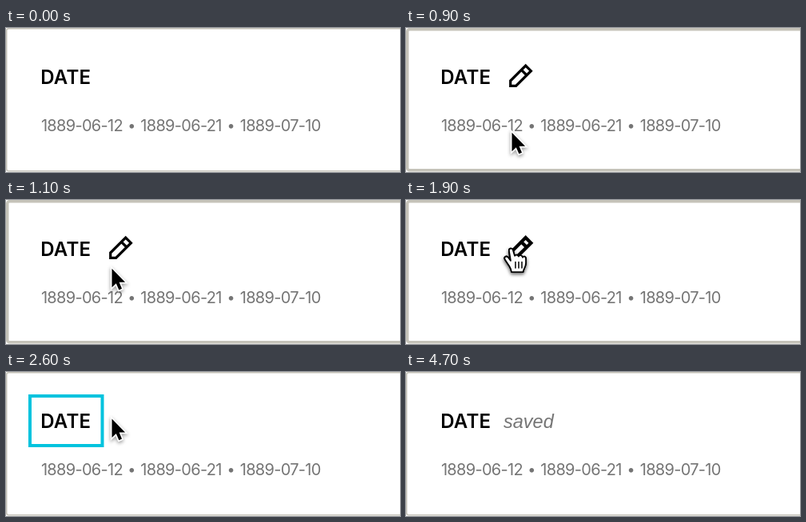
An HTML page with a canvas that plays this animation: 493x180 px, repeating every 6.2 s.

```html
<!DOCTYPE html>
<html lang="en">
<head>
<meta charset="utf-8">
<title>Date field</title>
<style>
html, body { margin: 0; width: 100%; height: 100%; overflow: hidden; background: #fff; }
canvas { display: block; width: 493px; height: 180px; }
</style>
</head>
<body>
<canvas id="stage"></canvas>
<script>
const W = 493, H = 180, LOOP = 6200;
const GRAY = '#757575', BORDER = '#c5c3b9', CYAN = '#00c3de';
const canvas = document.getElementById('stage');
const ctx = canvas.getContext('2d');
const dpr = window.devicePixelRatio || 1;
canvas.width = W * dpr;
canvas.height = H * dpr;

const ARROW = new Path2D('M0 0V23.4L5.3 18.4L8.9 26.6L12.5 25L9.1 17H16.6Z');
const HAND = new Path2D('M131 75L127.8 70.8C125.5 68 121.8 70.5 124 73.8L129.5 82' +
  'C131 84.5 131.6 85.5 132 89H146.5C146.5 86 150 83 150 78V72.5' +
  'C150 68.8 146.2 69 146 71C145.5 67.6 141.5 67.5 141 69.6' +
  'C140 67 136.8 67 136 68.8L133.8 61.5C132.8 58.3 128.2 59.3 129 63Z');
const KNUCKLES = new Path2D('M137 76.5V84M141 76.5V84M145 76.5V84');
const PENCIL = new Path2D('M130.7 72.3V66L149.7 47L156.4 53.7L137.6 72.3ZM144.4 52.4L151 59');

function text(str, x, y, font, color, align = 'left', spacing = '0px') {
  ctx.font = font;
  ctx.fillStyle = color;
  ctx.textAlign = align;
  ctx.letterSpacing = spacing;
  ctx.fillText(str, x, y);
}

function card(weight) {
  ctx.strokeStyle = BORDER;
  ctx.lineWidth = weight;
  ctx.beginPath();
  ctx.roundRect(weight / 2, weight / 2, W + 20, 179.5 - weight, 2.5);
  ctx.stroke();
}

function labels() {
  text('DATE', 43.2, 70, '600 24px Inter, sans-serif', '#000', 'left', '0.25px');
  const font = '400 20px Inter, sans-serif';
  ['1889-06-12', '1889-06-21', '1889-07-10'].forEach((date, i) => {
    const x = 43.9 + i * 124.4;
    text(date, x, 129, font, GRAY, 'left', '-0.7px');
    if (i < 2) text('•', x + 113.3, 127.6, '400 18px Inter, sans-serif', GRAY, 'center');
  });
}

function pencil(weight) {
  ctx.strokeStyle = '#000';
  ctx.lineWidth = weight;
  ctx.lineJoin = 'miter';
  ctx.stroke(PENCIL);
}

function shadow(alpha) {
  ctx.shadowColor = `rgba(0,0,0,${alpha})`;
  ctx.shadowBlur = alpha ? 4 * dpr : 0;
  ctx.shadowOffsetY = alpha ? 2 * dpr : 0;
}

function arrow(y) {
  ctx.save();
  ctx.translate(132.5, y + 1.6);
  ctx.lineJoin = 'miter';
  ctx.lineWidth = 3.4;
  ctx.strokeStyle = '#fff';
  shadow(0.4);
  ctx.stroke(ARROW);
  shadow(0);
  ctx.fillStyle = '#000';
  ctx.fill(ARROW);
  ctx.restore();
}

function hand(scale) {
  ctx.save();
  ctx.translate(131, 61);
  ctx.scale(scale, scale);
  ctx.translate(-131, -60);
  ctx.lineJoin = ctx.lineCap = 'round';
  ctx.lineWidth = 1.7;
  ctx.fillStyle = '#fff';
  ctx.strokeStyle = '#000';
  shadow(0.6);
  ctx.stroke(HAND);
  ctx.fill(HAND);
  shadow(0);
  ctx.fill(HAND);
  ctx.stroke(HAND);
  ctx.lineWidth = 1.5;
  ctx.stroke(KNUCKLES);
  ctx.restore();
}

// The pointer glides in 100 ms steps and slows down at the icon.
function glideY(t) {
  const p = Math.min(1, Math.floor((t - 800) / 100) / 6);
  return 160 - 101 * (1 - (1 - p) ** 2);
}

function draw(t) {
  const hover = t >= 900 && t < 2600;
  ctx.setTransform(dpr, 0, 0, dpr, 0, 0);
  ctx.fillStyle = '#fff';
  ctx.fillRect(0, 0, W, H);
  card(hover ? 3.5 : 1.5);
  labels();
  // The icon gets bolder once the pointer is over it.
  if (hover) pencil(t < 1200 ? 3.2 : 4.2);
  if (t >= 2600 && t < 4300) {
    ctx.strokeStyle = CYAN;
    ctx.lineWidth = 4;
    ctx.lineJoin = 'miter';
    ctx.strokeRect(30, 30, 90.5, 62);
  }
  if (t >= 4300) {
    text('saved', 122, 70, 'italic 23.5px "Liberation Sans", sans-serif', GRAY);
  }
  if (t >= 800 && t < 1500) arrow(glideY(t));
  else if (t >= 1500 && t < 2600) hand(t < 1900 ? 1.03 : 1);
  else if (t >= 2600 && t < 4700) arrow(57);
}

const start = performance.now();
function tick() {
  draw((performance.now() - start) % LOOP);
  requestAnimationFrame(tick);
}
tick();
</script>
</body>
</html>
```
